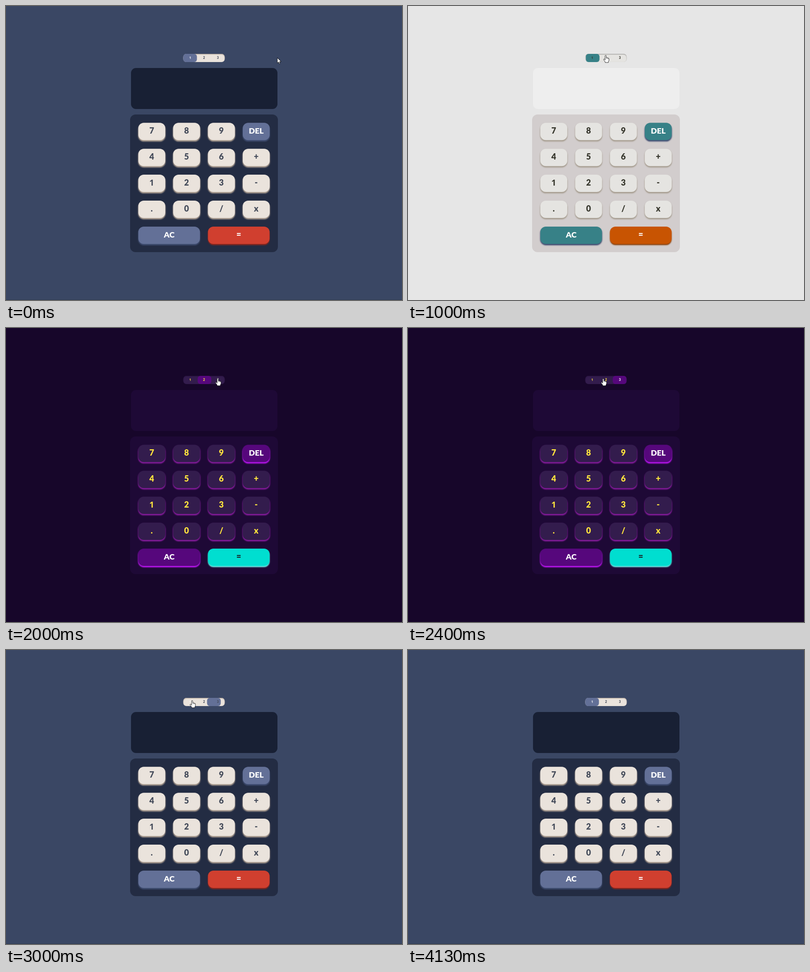
An HTML page for the animation above (4.54 s loop, 868 px wide and 645 px high).

```html
<!DOCTYPE html>
<html lang="en">
<head>
<meta charset="utf-8">
<title>Calculator themes</title>
<style>
  html, body { margin: 0; width: 100%; height: 100%; overflow: hidden; }
  body {
    position: relative;
    background: var(--bg);
    font-family: Lato, "Open Sans", sans-serif;
    font-weight: 900;
    cursor: default;
  }
  body[data-theme="0"] {
    --bg: #3a4764; --screen: #182034; --pad: #232c43; --edge: #2f3a50;
    --key: #eae3dc; --key-shadow: #b4a597; --ink: #434a59;
    --tool: #637097; --tool-shadow: #404e72;
    --eq: #d03f2f; --eq-shadow: #93261a; --eq-ink: #fff;
    --groove: #a4978a;
  }
  body[data-theme="1"] {
    --bg: #e6e6e6; --screen: #eeeeee; --pad: #d2cdcd; --edge: #e6e6e6;
    --key: #e5e4e1; --key-shadow: #a79e91; --ink: #36362c;
    --tool: #378187; --tool-shadow: #404e72;
    --eq: #c85402; --eq-shadow: #873901; --eq-ink: #fff;
    --groove: #8f8d8b;
  }
  body[data-theme="2"] {
    --bg: #17062a; --screen: #1e0936; --pad: #1e0936; --edge: #17062a;
    --key: #331c4d; --key-shadow: #881c9e; --ink: #ffe53d;
    --tool: #56077c; --tool-shadow: #be15f4;
    --eq: #00ded0; --eq-shadow: #6cf9f1; --eq-ink: #1a2327;
    --groove: #291440;
  }
  div, svg { position: absolute; left: 0; top: 0; }
  #edge { top: 644px; width: 100%; height: 1px; background: var(--edge); }
  #screen { left: 273.5px; top: 135.5px; width: 321px; height: 90px; border-radius: 11px; background: var(--screen); }
  #pad { left: 272px; top: 238px; width: 324px; height: 302px; border-radius: 12px; background: var(--pad); }
  #toggle {
    transform: translate(388.5px, 105px); width: 91px; height: 18px; border-radius: 7px;
    background: var(--key); box-shadow: inset 0 1px 2px var(--groove);
  }
  #knob { width: 30.4px; height: 18px; border-radius: 6px; background: var(--tool); }
  .option { width: 30.4px; font-size: 7px; line-height: 17px; text-align: center; color: var(--ink); }
  .option.on { color: #fff; }
  .key {
    width: 58.8px; height: 38.3px; border-radius: 12px;
    font-size: 18px; line-height: 35px; text-align: center;
    color: var(--ink); background: var(--key); box-shadow: 0 2.5px 2.5px .5px var(--key-shadow);
  }
  .wide { width: 135.1px; }
  .tool { color: #fff; font-size: 17.5px; background: var(--tool); box-shadow: 0 2.5px 2.5px .5px var(--tool-shadow); }
  .eq { color: var(--eq-ink); background: var(--eq); box-shadow: 0 2.5px 2.5px var(--eq-shadow); }
  .one { font-family: "Open Sans", "Noto Sans", sans-serif; font-weight: 700; }
  svg { overflow: visible; fill: #fff; stroke: #000; stroke-linejoin: round; stroke-linecap: round; }
</style>
</head>
<body data-theme="0">
<div id="edge"></div>
<div id="toggle"><div id="knob"></div></div>
<div id="screen"></div>
<div id="pad"></div>
<svg id="arrow" width="9" height="14" stroke-width=".8">
  <path d="M.5 .4V11.7L3.1 9.3L4.9 13.4L6.7 12.6L5 8.6H8.4Z"/>
</svg>
<svg id="hand" width="13" height="17" stroke-width=".8">
  <path d="M-1.3 8.8V1.5Q-1.3 .3 0 .3T1.3 1.5V5.2Q2.4 4.6 3.4 5.6Q4.5 5.1 5.3 6.3Q7.2 6 7.2 8V11Q7.2 12.6 5.9 14V16H-1.2V14.3L-4.3 10.3Q-5 8.9-4 8.3T-2.2 9L-1.3 10.2Z"/>
  <path d="M1.3 5.3V7.6M3.4 5.7V7.8M5.3 6.4V8" fill="none" stroke-width=".5"/>
</svg>
<script>
  const LOOP = 4540, TICK = 200 / 3, SLIDE = 500, OPTION = 30.3;
  const $ = id => document.getElementById(id);
  const arrow = $('arrow'), hand = $('hand'), knob = $('knob');
  const move = (el, x, y) => el.style.transform = `translate(${x}px, ${y}px)`;

  function add(parent, before, cls, text, x, y) {
    const el = document.createElement('div');
    el.className = cls + (text === '1' ? ' one' : '');
    el.textContent = text;
    move(el, x, y);
    parent.insertBefore(el, before);
    return el;
  }

  const key = (text, col, row, cls = '') =>
    add(document.body, arrow, 'key ' + cls, text, 290.1 + col * 76.3, 256.3 + row * 56.9);

  const options = [...'123'].map((s, i) => add($('toggle'), null, 'option', s, i * OPTION, 0));
  [...'789D456+123-.0/x'].forEach((s, i) =>
    s === 'D' ? key('DEL', 3, 0, 'tool') : key(s, i % 4, i >> 2));
  key('AC', 0, 4, 'wide tool');
  key('=', 2, 4, 'wide eq');

  // Areas where the pointer becomes a hand
  const hot = [...document.querySelectorAll('#toggle, .key')].map(el => el.getBoundingClientRect());

  const clamp = p => Math.min(1, Math.max(0, p));
  const smooth = p => p * p * (3 - 2 * p);
  const out = p => 1 - (1 - p) ** 2;

  // The CSS "ease" curve
  function ease(p) {
    let lo = 0, hi = 1, s = 0;
    for (let i = 0; i < 24; i++) {
      s = (lo + hi) / 2;
      if (.75 * s * (1 - s) + s ** 3 < p) lo = s; else hi = s;
    }
    return .3 * s * (1 - s) ** 2 + 3 * s * s * (1 - s) + s ** 3;
  }

  const slides = [{ at: 970, by: 1 }, { at: 1970, by: 1 }, { at: 2937, by: -2 }];

  // Pointer strokes; bow is the sag in the middle
  const home = [594.3, 113.5];
  const strokes = [
    { from: 0, to: 560, x: 437, y: 113, curve: smooth, bow: 11 },
    { from: 530, to: 800, x: 433.3, y: 108, curve: out },
    { from: 1130, to: 1600, x: 464, y: 110.7, curve: smooth },
    { from: 2130, to: 2800, x: 408, y: 110.7, curve: out },
    { from: 3180, to: 4070, x: 46, y: 636, curve: smooth }
  ];

  function pointerAt(t) {
    let [x, y] = home;
    for (const s of strokes) {
      const k = s.curve(clamp((t - s.from) / (s.to - s.from)));
      x += (s.x - x) * k;
      y += (s.y - y) * k + (s.bow || 0) * 4 * k * (1 - k);
    }
    return [x, y];
  }

  function draw(t) {
    const theme = Math.min(3, Math.floor(t / 1000 + 1e-6)) % 3;
    document.body.dataset.theme = theme;
    options.forEach((el, i) => el.classList.toggle('on', i === theme));

    const pos = slides.reduce((sum, s) => sum + s.by * ease(clamp((t - s.at) / SLIDE)), 0);
    move(knob, pos * OPTION, 0);

    const [x, y] = pointerAt(t);
    const over = hot.some(r => x >= r.left && x <= r.right && y >= r.top && y <= r.bottom);
    const gone = t > 4120;
    arrow.style.display = over || gone ? 'none' : 'block';
    hand.style.display = over && !gone ? 'block' : 'none';
    move(over ? hand : arrow, x, y);
  }

  // Motion advances at 15 pictures a second
  const begin = performance.now();
  function loop() {
    const t = (performance.now() - begin) % LOOP;
    draw(Math.floor((t + 4) / TICK) * TICK);
    requestAnimationFrame(loop);
  }
  draw(0);
  requestAnimationFrame(loop);
</script>
</body>
</html>
```
